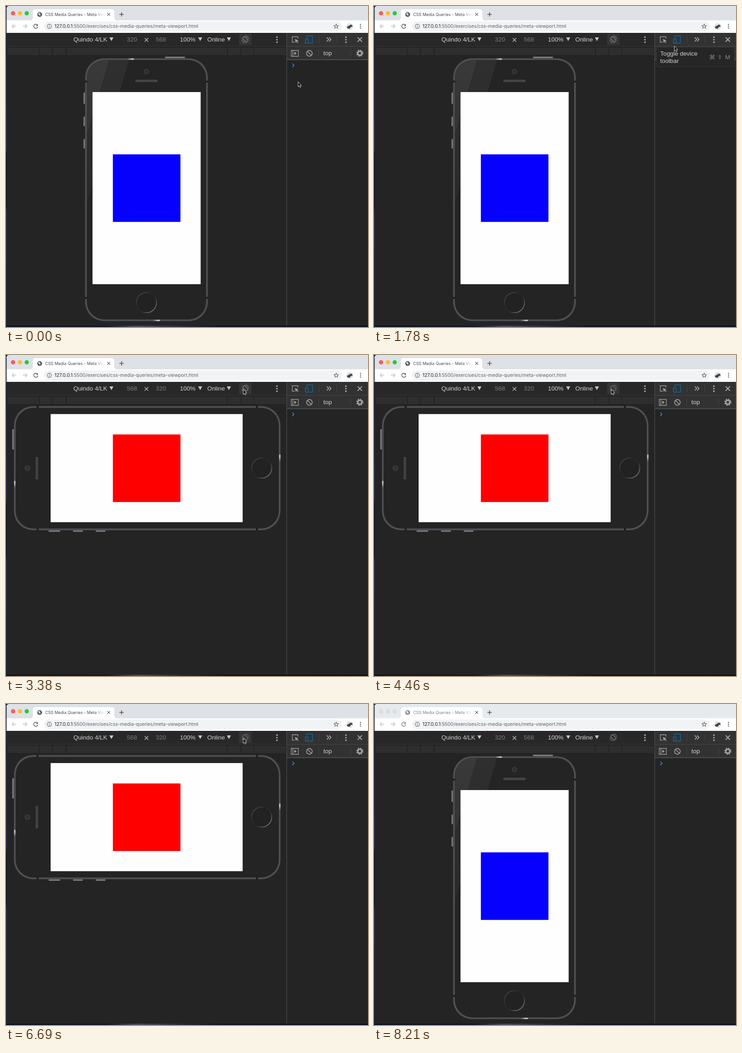
Recreate the animation shown at these times as an HTML page. Size 795x705 px, loop 8.31 s.

```html
<!DOCTYPE html>
<html lang="en">
<head>
<meta charset="utf-8">
<title>Viewport demo</title>
<style>
html, body { margin: 0; width: 100%; height: 100%; overflow: hidden; background: #242424; }
svg { display: block; width: 795px; height: 705px; }
text { white-space: pre; }
.ui { font: 10.43px Inter, Roboto, sans-serif; }
.tab { font-size: 9.03px; }
.dev { font: 13.4px "Liberation Sans", Arial, sans-serif; fill: #d2d2d2; }
.keys { font: 13px "DejaVu Sans", sans-serif; fill: #8c8c8c; }
.dim { fill: #7d7d7d; }
.line { fill: none; }
.port, .land, .press, .focus, .blur, .fade, .tip { animation: 8310ms step-end infinite; }
.port { animation-name: port; }
.land { animation-name: land; }
.press { animation-name: press; }
.focus { animation-name: focus; }
.blur { animation-name: blur; }
.fade { animation-name: fade; }
.tip { animation-name: tip; }
.cursor { animation: move 8310ms infinite; }

@keyframes port {
  0%, 55.715%, 81.587% { opacity: 1; }
  40.673%, 68.591% { opacity: 0; }
  100% { opacity: 1; }
}
@keyframes land {
  0%, 55.715%, 81.587% { opacity: 0; }
  40.673%, 68.591% { opacity: 1; }
  100% { opacity: 0; }
}
@keyframes press {
  0%, 40.673%, 55.715%, 68.591%, 81.587%, 100% { opacity: 1; }
  39.59%, 53.669%, 67.628%, 80.504% { opacity: .7; }
}
@keyframes focus { 0% { opacity: 1; } 98.796%, 100% { opacity: 0; } }
@keyframes blur { 0% { opacity: 0; } 98.796%, 100% { opacity: 1; } }
@keyframes fade { 0% { opacity: 1; } 98.796%, 100% { opacity: .7; } }
@keyframes tip { 0%, 23.585%, 100% { opacity: 0; } 11.913% { opacity: 1; } }
@keyframes move {
  0% { transform: translate(641px, 166px); animation-timing-function: step-end; }
  3.249% { transform: translate(641px, 166px); animation-timing-function: steps(4, start); }
  7.58% { transform: translate(653px, 47px); animation-timing-function: steps(6, start); }
  14.078% { transform: translate(656px, 66px); animation-timing-function: steps(2, start); }
  16.245% { transform: translate(657px, 75px); animation-timing-function: steps(2, start); }
  18.411% { transform: translate(657px, 72px); animation-timing-function: step-end; }
  21.419% { transform: translate(659px, 87.5px); animation-timing-function: step-end; }
  22.502% { transform: translate(659px, 87.5px); animation-timing-function: steps(3, start); }
  25.751% { transform: translate(654px, 149px); animation-timing-function: step-end; }
  27.918% { transform: translate(654px, 149px); animation-timing-function: steps(4, start); }
  32.13% { transform: translate(566px, 95px); animation-timing-function: steps(4, start); }
  36.34% { transform: translate(520.5px, 75px); animation-timing-function: step-end; }
  87.003% { transform: translate(520.5px, 75px); animation-timing-function: steps(10, start); }
  97.833%, 100% { transform: translate(768px, 708px); animation-timing-function: step-end; }
}
</style>
</head>
<body>
<svg viewBox="0 0 795 705" stroke-width="1.3" xmlns="http://www.w3.org/2000/svg">
  <defs>
    <linearGradient id="desk" x2="0" y2="1">
      <stop offset="0" stop-color="#131c33"/>
      <stop offset=".44" stop-color="#26345c"/>
      <stop offset=".46" stop-color="#080c18"/>
      <stop offset=".62" stop-color="#0b1020"/>
      <stop offset=".64" stop-color="#2b3550"/>
      <stop offset="1" stop-color="#1a2136"/>
    </linearGradient>
    <linearGradient id="floor">
      <stop offset="0" stop-color="#0d1322"/>
      <stop offset=".28" stop-color="#12162a"/>
      <stop offset=".36" stop-color="#4b4a60"/>
      <stop offset=".5" stop-color="#25263a"/>
      <stop offset=".6" stop-color="#0d1222"/>
      <stop offset="1" stop-color="#0b1122"/>
    </linearGradient>
    <linearGradient id="title" gradientUnits="userSpaceOnUse" x1="196" x2="216">
      <stop offset="0" stop-color="#45494d"/>
      <stop offset="1" stop-color="#45494d" stop-opacity="0"/>
    </linearGradient>
    <linearGradient id="ring" x2="1" y2="1">
      <stop offset=".1" stop-color="#4a4a4a"/>
      <stop offset=".4" stop-color="#272727"/>
      <stop offset=".6" stop-color="#2c2c2c"/>
      <stop offset=".88" stop-color="#7a7a7a"/>
    </linearGradient>
    <linearGradient id="glint">
      <stop offset="0" stop-color="#ddd" stop-opacity="0"/>
      <stop offset=".75" stop-color="#d4d4d4"/>
      <stop offset="1" stop-color="#b8b8b8"/>
    </linearGradient>
    <linearGradient id="gloss" gradientUnits="userSpaceOnUse" x1="0" x2="0" y1="119" y2="430">
      <stop offset="0" stop-color="#f4fff4" stop-opacity=".05"/>
      <stop offset="1" stop-color="#f4fff4" stop-opacity=".025"/>
    </linearGradient>
    <clipPath id="face"><rect x="178" y="119" width="261" height="569" rx="38"/></clipPath>

    <g id="body">
      <g fill="#7b7e82">
        <rect x="349" y="111.3" width="44" height="4" rx="1"/>
        <rect x="170.3" y="190" width="3.5" height="25" rx="1"/>
        <rect x="170.3" y="243" width="3.5" height="21" rx="1"/>
        <rect x="170.3" y="292" width="3.5" height="21" rx="1"/>
      </g>
      <rect x="173.3" y="114.5" width="270.4" height="578" rx="42" fill="#37393c"/>
      <rect x="174.3" y="115.4" width="268.4" height="576" rx="41" fill="#505357"/>
      <rect x="177" y="118" width="263" height="571" rx="39" fill="#37393c"/>
      <rect x="178" y="119" width="261" height="569" rx="38" fill="#242424"/>
      <g fill="#1c1c1c">
        <rect x="173" y="164" width="5.5" height="4"/>
        <rect x="438.5" y="164" width="5.5" height="4"/>
        <rect x="173" y="639" width="5.5" height="4"/>
        <rect x="438.5" y="639" width="5.5" height="4"/>
      </g>
      <rect x="266" y="115.2" width="15" height="2.8" fill="url(#glint)"/>
      <rect x="323" y="689.2" width="15" height="2.8" fill="url(#glint)"/>
      <circle cx="308.5" cy="144" r="5.2" fill="#29292c" stroke="#47474d" stroke-width="1.2"/>
      <circle cx="308.5" cy="144" r="2.3" fill="#1c1c26" stroke="#45465c" stroke-width="1"/>
      <rect x="284" y="162" width="49" height="5" rx="2.5" fill="#4c4c4c"/>
      <path d="M286 163.7h45M286.8 165.4h45" stroke="#2c2c2c" stroke-width="1" stroke-dasharray=".8 .8"/>
    </g>
    <circle id="home" r="22" fill="#222" stroke="url(#ring)" stroke-width="1.8"/>
    <path id="down" d="M0 0h9l-4.5 8z" fill="#c6c6c6"/>
    <g id="dots"><circle r="1.8" cy="-5.6"/><circle r="1.8"/><circle r="1.8" cy="5.6"/></g>
    <path id="cross" d="M-4-4 4 4M4-4-4 4"/>
  </defs>

  <!-- desktop and window -->
  <rect width="795" height="705" fill="#242424"/>
  <rect width="795" height="32" fill="#0d1426"/>
  <path d="M1 32V6q0-6 6-6H795V32z" fill="#dee1e6"/>
  <path class="blur" d="M1 32V6q0-6 6-6H795V32z" fill="#e7eaed"/>
  <rect y="6" width="1.4" height="699" fill="url(#desk)"/>
  <rect y="702" width="795" height="3" fill="url(#floor)"/>

  <!-- tab strip -->
  <g class="focus">
    <circle cx="15.5" cy="16" r="4.7" fill="#fc5b57"/>
    <circle cx="30.5" cy="16" r="4.7" fill="#fdbc2f"/>
    <circle cx="45.5" cy="16" r="4.7" fill="#29c941"/>
  </g>
  <g class="blur" fill="#dcdfe2" stroke="#d2d5d8" stroke-width=".7">
    <circle cx="15.5" cy="16" r="4.5"/><circle cx="30.5" cy="16" r="4.5"/><circle cx="45.5" cy="16" r="4.5"/>
  </g>
  <path d="M1.4 31.5H53q6 0 6-6V13q0-6 6-6H232q6 0 6 6v12.5q0 6 6 6H795V59H1.4z" fill="#fff"/>
  <g class="fade">
    <circle cx="74" cy="18.5" r="5.3" fill="#50555a"/>
    <path d="M70 17q3-3 4.5-2.500l-1 2.500 2.500 1.500-1 3.500-2-2zM76.500 14.500l1.500 2h-1.500z" fill="#e6e8ea"/>
    <text class="ui tab" x="86" y="22" fill="url(#title)">CSS Media Queries - Meta Viewp</text>
  </g>
  <g class="line" stroke="#4a4e52">
    <use href="#cross" transform="translate(225.5 18.5) scale(.78)"/>
    <path d="M249 18.500h9.500M253.750 13.750v9.500" stroke-width="1.500"/>
  </g>

  <!-- address bar -->
  <path class="line" d="M22.500 44.500H13.500M17.800 40l-4.500 4.500 4.500 4.500M37 44.500h9M41.700 40l4.500 4.500-4.500 4.500" stroke="#bcc0c4"/>
  <g class="fade">
    <path class="line" d="M68.800 41.600A4.500 4.500 0 1 0 69.800 45.500" stroke="#54585d" stroke-width="1.400"/>
    <path d="M70 39.500v4.300h-4.300z" fill="#54585d"/>
  </g>
  <rect x="83" y="34" width="655" height="21" rx="10.5" fill="#f1f3f4"/>
  <g class="line" stroke="#5f6368" stroke-width="1.1">
    <circle cx="95.2" cy="44.5" r="4.6"/>
    <path d="M95.200 43.800v3.300M95.200 41.700v1.200"/>
    <path d="M725.200 39.700l1.400 3.200 3.500.3-2.700 2.300.8 3.400-3-1.800-3 1.800.8-3.400-2.700-2.300 3.500-.3z"/>
  </g>
  <text class="ui" x="106.5" y="48.2" fill="#5f6368"><tspan fill="#202124">127.0.0.1</tspan>:5500/exercises/css-media-queries/meta-viewport.html</text>
  <circle cx="755" cy="45" r="7.3" fill="#dfe1e1"/>
  <path d="M748.500 47q1-3 5-3.500 2-3 6-2 2 2 1 4l-3 .5-3 4q-4 0-6-3z" fill="#444645"/>
  <use href="#dots" transform="translate(778.5 44.5) scale(.72)" fill="#5f6368"/>

  <!-- device toolbar and ruler -->
  <rect x="1.4" y="59" width="615" height="29" fill="#282828"/>
  <rect x="1.4" y="88" width="615" height="1" fill="#3a3a3a"/>
  <rect x="1.4" y="89" width="615" height="20" fill="#202020"/>
  <path d="M3 91h69.500v17H3zM74 91h27v17H74zM102.500 91h28.500v17h-28.500zM133 91h352.500v17H133zM487 91h28.500v17H487zM517 91h27v17h-27zM545 91h70v17h-70z" fill="#2e2e2e"/>
  <rect class="focus" x="512" y="61" width="27" height="24.5" fill="#353535"/>
  <g class="dev">
    <text x="148" y="78">Quindo 4/LK</text>
    <text x="382" y="78">100%</text>
    <text x="442" y="78">Online</text>
    <g class="port"><text class="dim" x="265.5" y="78">320</text><text class="dim" x="329" y="78">568</text></g>
    <g class="land"><text class="dim" x="265.5" y="78">568</text><text class="dim" x="329" y="78">320</text></g>
  </g>
  <use class="line" href="#cross" x="308.5" y="74.5" stroke="#c4c4c4"/>
  <use href="#down" x="227" y="69"/>
  <use href="#down" x="422" y="69"/>
  <use href="#down" x="485" y="69"/>
  <use href="#dots" x="595" y="74" fill="#a5a5a5"/>
  <g class="press line" stroke="#979797" stroke-width="1.2" transform="translate(525.6 73.2)">
    <rect x="-3.2" y="-6" width="6.4" height="12" rx="1" transform="rotate(-45)"/>
    <path d="M-7.300 1a7.400 7.400 0 0 0 6.800 6.400M7.300-1a7.400 7.400 0 0 0-6.800-6.400"/>
  </g>

  <!-- phone, upright -->
  <g class="port">
    <use href="#body"/>
    <g clip-path="url(#face)" fill="url(#gloss)">
      <path d="M178 119h48L178 281z"/>
      <path d="M178 119h92L178 430z"/>
    </g>
    <use href="#home" x="308.5" y="651.5"/>
    <rect x="190" y="189" width="237.5" height="422" fill="#fefefe"/>
    <rect x="234.7" y="325.8" width="148.4" height="148.4" fill="#0500ff"/>
  </g>

  <!-- phone, on its side -->
  <g class="land">
    <use href="#body" transform="matrix(0 -1.012 1.0142 0 -99.05 560.7)"/>
    <use href="#home" x="561.5" y="248.3"/>
    <rect x="98" y="129.7" width="421.7" height="237.5" fill="#fefefe"/>
    <rect x="234.7" y="174.5" width="148.4" height="148.4" fill="#f00"/>
  </g>

  <!-- console panel -->
  <rect x="617" y="59" width="178" height="59" fill="#323232"/>
  <rect x="617" y="88" width="178" height="1" fill="#474747"/>
  <rect x="617" y="117.5" width="178" height="1" fill="#686868"/>
  <rect x="616" y="59" width="1" height="643" fill="#545454"/>
  <path d="M687.500 66v15M725.500 66v15M686.500 96v15M757.500 96v15" stroke="#454545" stroke-width="1"/>
  <g class="line" stroke="#a0a0a0">
    <path d="M634 79.500h-5.300v-12h12.500v4"/>
    <path d="M634.500 72.500l8 3.300-3.200 1.200 3 3.300-1.400 1.200-3-3.300-1.700 2.800z" fill="#a0a0a0" stroke="none"/>
    <path d="M704.500 69l4.300 4.500-4.300 4.500M709.500 69l4.300 4.500-4.300 4.500" stroke="#b4b4b4" stroke-width="1.600"/>
    <use href="#cross" transform="translate(777 73.7) scale(1.2)" stroke="#b0b0b0" stroke-width="1.5"/>
    <path d="M626.500 97.500h15.500v13h-15.500zM630 97.500v13"/>
    <path d="M633 100.500v7l5.500-3.500z" fill="#a0a0a0" stroke="none"/>
    <circle cx="666.3" cy="104" r="6.3" stroke-width="1.7"/>
    <path d="M662 99.600l8.700 8.800" stroke-width="1.700"/>
    <circle cx="777" cy="103.700" r="4.300" stroke-width="3.400"/>
    <circle cx="777" cy="103.700" r="6.500" stroke-width="2.600" stroke-dasharray="2.800 2.305"/>
  </g>
  <g class="line" stroke="#1268a0" stroke-width="1.5">
    <path d="M660.500 71v-5.300h12.500v15.800h-8.500"/>
    <rect x="657.5" y="72.5" width="6" height="9"/>
  </g>
  <use href="#dots" x="746.5" y="74" fill="#a5a5a5"/>
  <text class="dev" x="697" y="108">top</text>
  <path class="line" d="M628.700 126.500l4 3.800-4 3.800" stroke="#3880e6" stroke-width="1.700"/>

  <g class="tip">
    <rect x="620.5" y="90.5" width="171" height="43" rx="1" fill="#262626" stroke="#363636" stroke-width="1"/>
    <g class="dev">
      <text x="628.5" y="109">Toggle device</text>
      <text x="628.5" y="125">toolbar</text>
    </g>
    <text class="keys" x="736" y="117">⌘</text>
    <text class="keys" x="754" y="117">⇧</text>
    <text class="dev" x="771" y="117" style="fill:#8c8c8c">M</text>
  </g>

  <path class="cursor" d="M.5.5V11.300L3 9l1.700 3.800 1.900-.8L5 8.300H8z" fill="#000" stroke="#f2f2f2" stroke-width=".9"/>
</svg>
</body>
</html>
```
